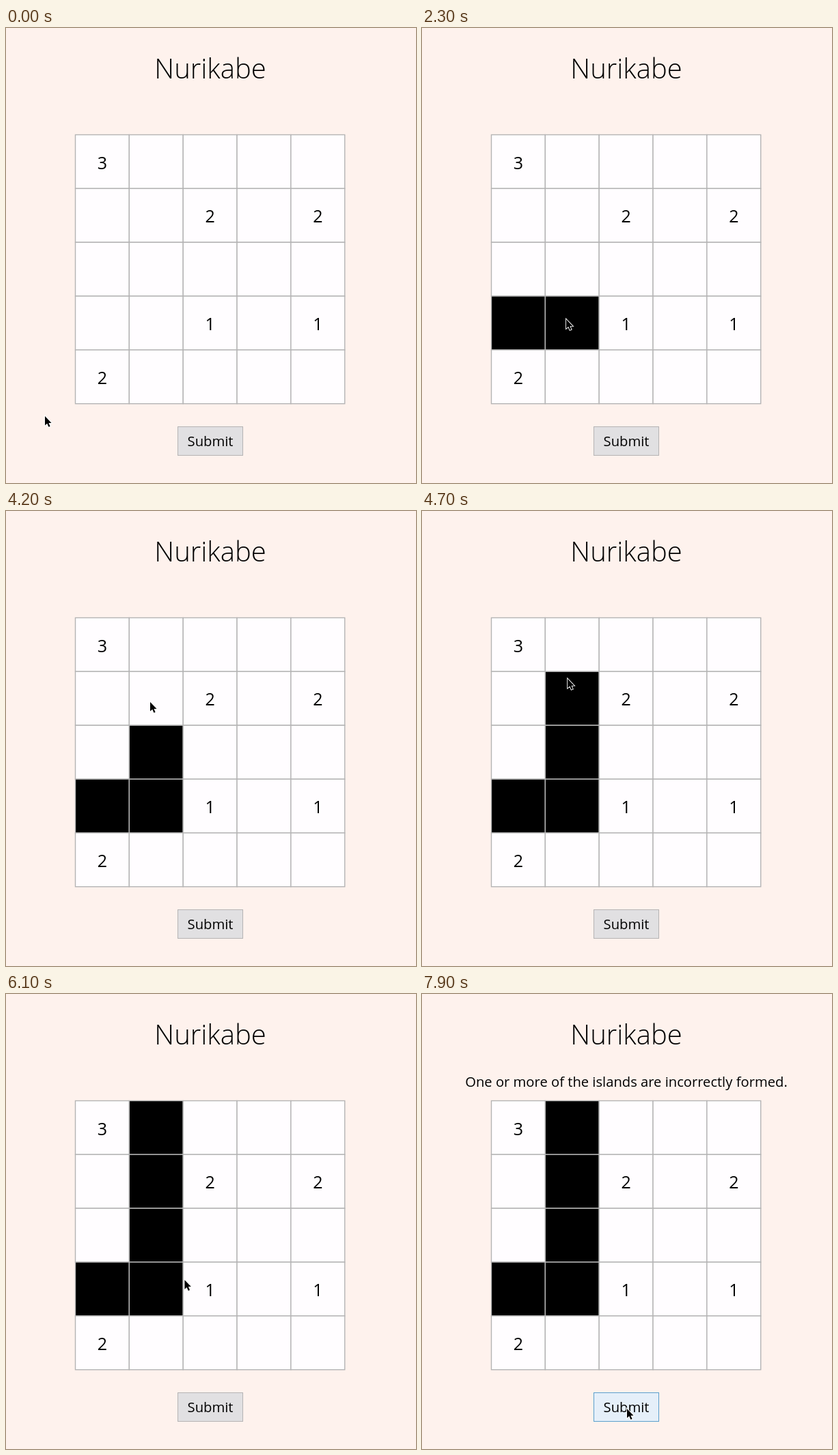
Recreate the animation shown at these times as an HTML page. Size 600x667 px, loop 8 s.

```html
<!DOCTYPE html>
<html lang="en">
<head>
<meta charset="utf-8">
<title>Nurikabe</title>
<style>
  html, body { margin: 0; width: 100%; height: 100%; overflow: hidden; background: #fef2ed; }
  svg { display: block; width: 100%; height: 100%; }
  text { font: 20.2px "Open Sans", "Noto Sans", sans-serif; text-anchor: middle; }
  .title { font-size: 40px; font-weight: 300; }
  .clue { font-size: 25px; }
  .cell { fill: #fffdff; stroke: #b4b4b4; stroke-width: 1.4; }
  .cell.on { fill: #000; }
  #button { fill: #e1e0e2; stroke: #b5b3b4; }
  #button.hover { fill: #e5eff9; stroke: #5a9fcd; }
  #cursor { stroke: #fff; stroke-width: 1.8; paint-order: stroke; }
</style>
</head>
<body>
<svg viewBox="0 0 600 667">
  <text class="title" x="299" y="74">Nurikabe</text>
  <text id="message" x="299" y="136">One or more of the islands are incorrectly formed.</text>
  <g id="grid"></g>
  <rect id="button" x="251.5" y="584.5" width="95" height="42"/>
  <text x="299" y="613">Submit</text>
  <path id="cursor" d="M0 0V13.5L3.2 10.8L5.4 15.8L7.6 14.9L5.5 9.9H9.5Z"/>
</svg>
<script>
const LOOP = 8000, STEP = 100, SIZE = 78.85, LEFT = 101.5, TOP = 156.5;
const FIRST = 340, BEAT = 970, REST = 150, SETTLE = 80;
const $ = id => document.getElementById(id);
const clues = ["3....", "..2.2", ".....", "..1.1", "2...."];

// Pointer stops: x, y, beat on which the pointer clicks or pauses there
const stops = [
  [57, 569, -0.35],
  [132, 428, 1], [211, 427, 2], [211, 352, 3], [211, 280, 4], [216, 199, 5],
  [298, 597, 6.7], [300, 608, 7]
].map(([x, y, beat]) => ({ x, y, at: FIRST + BEAT * beat }));

function add(tag, attrs, text = "") {
  const el = document.createElementNS("http://www.w3.org/2000/svg", tag);
  for (const key in attrs) el.setAttribute(key, attrs[key]);
  el.textContent = text;
  return $("grid").appendChild(el);
}

const cells = clues.map((line, row) => [...line].map((clue, col) => {
  const x = LEFT + col * SIZE, y = TOP + row * SIZE;
  const cell = add("rect", { class: "cell", x, y, width: SIZE, height: SIZE });
  if (clue !== ".") add("text", { class: "clue", x: x + SIZE / 2, y: y + 50 }, clue);
  return cell;
}));

const cellAt = ({ x, y }) =>
  cells[Math.floor((y - TOP) / SIZE)]?.[Math.floor((x - LEFT) / SIZE)];

function pointer(t) {
  let { x, y } = stops[0];
  for (let i = 1; i < stops.length; i++) {
    const start = stops[i - 1].at + REST, end = stops[i].at - SETTLE;
    const u = Math.min(1, Math.max(0, (t - start) / (end - start)));
    const k = u * u * (3 - 2 * u);
    x += (stops[i].x - x) * k;
    y += (stops[i].y - y) * k;
  }
  return { x, y };
}

function draw(now) {
  const t = Math.floor((now % LOOP) / STEP) * STEP;
  const { x, y } = pointer(t);
  $("cursor").setAttribute("transform", `translate(${x} ${y})`);
  for (const stop of stops) cellAt(stop)?.classList.toggle("on", t >= stop.at);
  $("button").classList.toggle("hover", y > 584 && x > 251);
  $("message").style.visibility = t >= stops.at(-1).at ? "visible" : "hidden";
}

let began;
function tick(now) {
  began ??= now;
  draw(now - began);
  requestAnimationFrame(tick);
}
draw(0);
requestAnimationFrame(tick);
</script>
</body>
</html>
```
